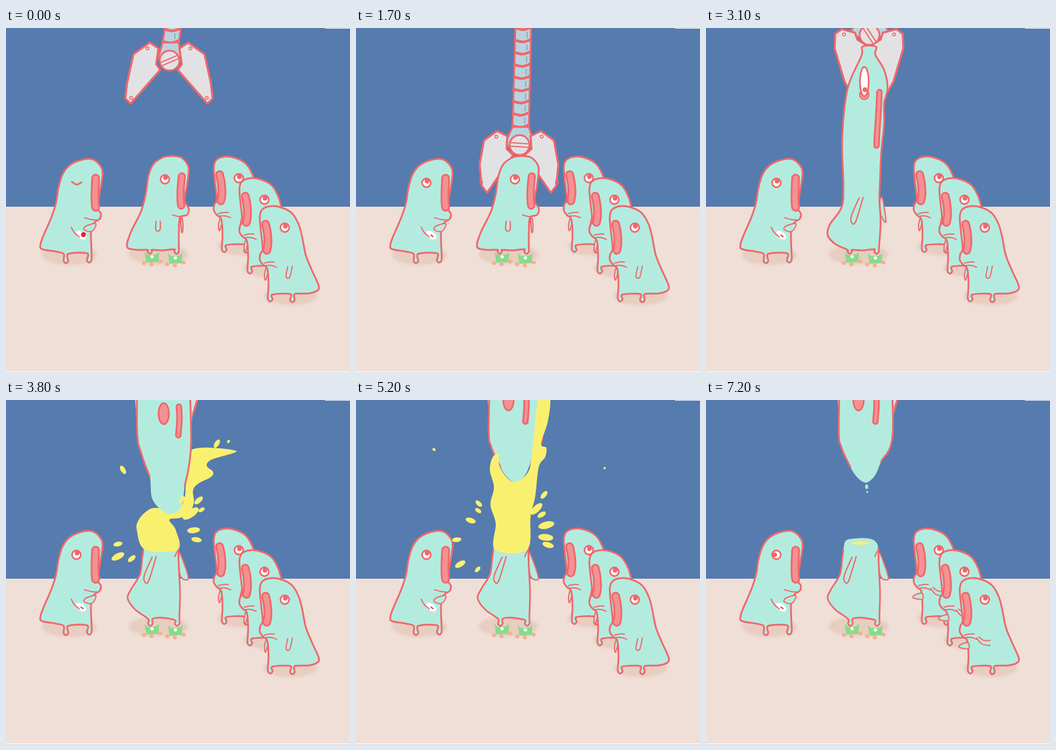
Animation of 591x591 px, one loop 7300 ms. Source, as an HTML page with a canvas:

```html
<!DOCTYPE html>
<html lang="en">
<head>
<meta charset="utf-8">
<title>Claw</title>
<style>
html, body { margin: 0; width: 100%; height: 100%; overflow: hidden; background: #efdfd7; }
canvas { display: block; width: 591px; height: 591px; }
</style>
</head>
<body>
<canvas id="stage" width="591" height="591"></canvas>
<script>
const ctx = document.getElementById('stage').getContext('2d');
const LOOP = 7300, STEP = 100;
const MINT = '#b3ecdf', CORAL = '#f0676b', PINK = '#f49293', YELLOW = '#faf070',
  STEEL = '#e2e2e4', SHAFT = '#b9d3de', WHITE = '#fff';

const lerp = (a, b, k) => a + (b - a) * k;
const mix = (a, b, k) => a.map((v, i) => lerp(v, b[i], k));
const shift = (pts, dx, dy) => pts.map((v, i) => v + (i % 2 ? dy : dx));

// Piecewise linear value over [time, value] pairs
function track(t, keys) {
  if (t <= keys[0][0]) return keys[0][1];
  for (let i = 1; i < keys.length; i++) {
    const [t0, a] = keys[i - 1], [t1, b] = keys[i];
    if (t <= t1) return lerp(a, b, (t - t0) / (t1 - t0));
  }
  return keys[keys.length - 1][1];
}

function paint(fill, stroke, width = 3) {
  if (fill) { ctx.fillStyle = fill; ctx.fill(); }
  if (stroke) { ctx.strokeStyle = stroke; ctx.lineWidth = width; ctx.stroke(); }
}

// Smooth curve through flat x,y points
function curve(pts, fill, stroke, width, open) {
  const n = pts.length / 2;
  const at = i => {
    const j = open ? Math.max(0, Math.min(n - 1, i)) : (i + n) % n;
    return [pts[2 * j], pts[2 * j + 1]];
  };
  ctx.beginPath();
  ctx.moveTo(...at(0));
  for (let i = 0; i < (open ? n - 1 : n); i++) {
    const a = at(i - 1), b = at(i), c = at(i + 1), d = at(i + 2);
    ctx.bezierCurveTo(b[0] + (c[0] - a[0]) / 6, b[1] + (c[1] - a[1]) / 6,
      c[0] - (d[0] - b[0]) / 6, c[1] - (d[1] - b[1]) / 6, c[0], c[1]);
  }
  if (!open) ctx.closePath();
  paint(fill, stroke, width);
}

const line = (pts, width = 2, color = CORAL) => curve(pts, null, color, width, true);

function mouth(pts, width) {
  line(pts, width);
  line(pts, width - 6, PINK);
}

// Outline points of a stubby leg, right to left, hanging from y
const leg = (x, y, h) => [x + 4, y, x + 4, y + h - 4, x, y + h, x - 4, y + h - 4, x - 4, y];

function poly(pts, fill, stroke, width) {
  ctx.beginPath();
  for (let i = 0; i < pts.length; i += 2) ctx.lineTo(pts[i], pts[i + 1]);
  ctx.closePath();
  paint(fill, stroke, width);
}

function oval(x, y, rx, ry, fill, stroke, width, turn = 0) {
  ctx.beginPath();
  ctx.ellipse(x, y, rx, ry, turn, 0, 7);
  paint(fill, stroke, width);
}

function shadow(x, y, rx, ry) {
  ctx.filter = 'blur(2px)';
  oval(x, y, rx, ry, 'rgba(226,190,176,.55)');
  ctx.filter = 'none';
}

function eye(x, y, dx, dy, ry = 7.5) {
  oval(x, y, 7.5, ry, WHITE, CORAL, 2.8);
  oval(x + dx, y + dy, 4, 4, CORAL);
}

function closedEye(x, y) {
  line([x - 8, y - 1, x, y + 4, x + 9, y], 2.8);
}

function room() {
  ctx.fillStyle = '#efdfd7';
  ctx.fillRect(0, 0, 591, 591);
  ctx.fillStyle = '#567bae';
  ctx.fillRect(0, 0, 591, 307);
  ctx.fillStyle = WHITE;
  ctx.fillRect(0, 590, 591, 1);
  ctx.fillRect(548, 0, 43, 1);
}

const FILMER = [59, 373, 63, 360, 78, 325, 86, 300, 90, 275, 97, 252, 108, 237, 125, 228, 146, 225, 160, 234,
  166, 250, 160, 290, 157, 309, 163, 319, 161, 328, 153, 333, 147, 342, 146, 360,
  ...leg(143, 387, 16), ...leg(103, 388, 16), 85, 384, 62, 380];

function filmer(t) {
  shadow(109, 390, 47, 17);
  curve(FILMER, MINT, CORAL);
  mouth([154, 258, 153, 280, 153, 298, 154, 308], 15);
  line([135, 326, 146, 329, 158, 330]);
  curve([134, 346, 138, 340, 154, 336, 151, 346, 144, 350], MINT, CORAL, 2);
  ctx.save();
  ctx.translate(129, 356);
  ctx.rotate(.6);
  oval(0, 0, 10, 6, WHITE);
  ctx.fillStyle = '#b8484e';
  if (t >= 900) ctx.fillRect(-1, -1, 6, 2);
  ctx.restore();
  if (t < 900) oval(133, 355, 4.2, 4.2, '#f01f2a');
  line([112, 342, 117, 351, 126, 359]);
  if (t % 4400 < 200) return closedEye(121, 265);
  const aside = (t >= 1900 && t < 2600) || t >= 6600;
  eye(121, 266, aside ? -3 : 1, aside ? 0 : -3);
}

const WATCHER = [436, 325, 440, 312, 455, 306, 475, 309, 492, 319, 503, 338, 509, 360, 515, 390, 525, 415,
  537, 442, 535, 451, 520, 456, ...leg(492, 457, 14), ...leg(454, 458, 12),
  451, 440, 449, 414, 441, 406, 436, 398, 437, 388, 441, 379, 438, 350];

function watcher(dx, dy, t) {
  const clapping = t >= 5500, sway = Math.floor(t / 200) % 2 * 3;
  ctx.save();
  ctx.translate(dx, dy);
  shadow(489, 460, 46, 16);
  if (!clapping) curve([447, 412, 444, 425, 446, 433, 451, 415], MINT, CORAL, 2);
  curve(WATCHER, MINT, CORAL);
  mouth([446, 337, 449, 352, 450, 370, 448, 382], 15);
  line([444, 404, 453, 402, 461, 402]);
  line([447, 408, 456, 408, 465, 411]);
  if (clapping) {
    curve(shift([450, 417, 438, 420, 435, 425, 451, 427], 0, sway), MINT, CORAL, 2);
    line(shift([465, 409, 474, 419, 488, 422], 0, sway));
    line(shift([469, 407, 477, 413, 488, 413], 0, sway));
  } else {
    line([484, 410, 481, 426, 484, 430, 488, 427, 492, 409]);
  }
  if (t % 1600 === 500) closedEye(479, 342);
  else eye(479, 343, 1, -2.5);
  ctx.restore();
}

const BLADE_OPEN = [-33, -31, -18, -21, -22, 6, -15, 16, -66, 74, -75, 65, -72, 39, -61, -11];
const BLADE_SHUT = [-47, -10, -24, -4, -20, 8, 0, 20, -32, 98, -42, 80, -59, 23, -58, -2];

function claw(y, shut) {
  const top = y - 31;
  poly([274, -5, 301, -5, 297, top, 269, top], SHAFT, CORAL);
  for (let b = top; b > -6; b -= 21) {
    const x = lerp(269, 274, (top - b) / (top + 6));
    line([x, b - 2, x + 14, b + 1, x + 27, b - 3], 4.5);
    ctx.fillStyle = '#8fa9b7';
    ctx.fillRect(x + 20, b - 16, 2, 10);
  }
  const spread = 19 + 14 * shut;
  poly([269, top, 297, top, 281 + spread, y - 6, 277 + spread, y + 3, 285 - spread, y + 3, 281 - spread, y - 6],
    SHAFT, CORAL);
  for (const side of [1, -1]) {
    ctx.save();
    ctx.translate(280, y);
    ctx.scale(side, 1);
    poly(mix(BLADE_OPEN, BLADE_SHUT, shut), STEEL, CORAL, 3.5);
    oval(lerp(-37, -43, shut), lerp(-21, -1, shut), 2.5, 2.5, null, CORAL, 1.5);
    if (shut < .5) oval(-65, 64, 2.5, 2.5, null, CORAL, 1.5);
    ctx.restore();
  }
}

function screw(y, shut) {
  oval(281, y, 17, 17, STEEL, CORAL, 3);
  ctx.save();
  ctx.translate(281, y);
  ctx.rotate(lerp(-.4, 1, shut));
  for (const dy of [-3, 3]) line([-15, dy, 15, dy], 2);
  ctx.restore();
}

// Three poses each: standing, gripped, stretched
const FEET = [...leg(293, 380, 8), 270, 382, ...leg(247, 381, 7)];
const STANDING = [223, 381, 208, 376, 214, 352, 232, 315, 240, 285, 245, 253, 254, 233, 270, 222, 282, 220,
  288, 220, 300, 222, 309, 230, 314, 242, 311, 270, 307, 296, 314, 310, 311, 321, 299, 326, 297, 350];
const GRIPPED = [222, 382, 208, 372, 223, 346, 232, 318, 235, 280, 241, 240, 246, 212, 271, 186, 271, 172,
  290, 172, 291, 186, 304, 197, 309, 214, 304, 245, 307, 275, 303, 302, 306, 315, 298, 322, 297, 350];
const STRETCHED = [222, 371, 209, 356, 213, 337, 233, 308, 236, 270, 234, 190, 243, 105, 267, 48, 269, 32,
  292, 32, 291, 46, 306, 72, 312, 103, 306, 130, 306, 165, 301, 215, 299, 262, 298, 295, 300, 335];
const BODY = [STANDING, GRIPPED, STRETCHED];
const MOUTH = [
  [302, 255, 300, 278, 300, 296, 301, 305],
  [297, 227, 298, 250, 298, 275, 297, 294],
  [298, 110, 296, 150, 294, 180, 293, 202]];
const ARM = [
  [258, 332, 257, 345, 261, 349, 265, 345, 265, 332],
  [257, 332, 250, 342, 251, 348, 258, 345, 266, 335],
  [263, 292, 250, 322, 250, 334, 257, 333, 270, 291]];
const BACK_ARM = [
  [300, 330, 302, 351, 304, 345, 303, 328],
  [300, 332, 306, 356, 297, 347, 297, 340],
  [303, 292, 309, 333, 300, 320, 298, 300]];
const EYE = [[273, 260, 7.5, -3], [273, 220, 15, -7], [272, 92, 25, 14]];

function victim(pull) {
  const i = pull < 1 ? 0 : 1;
  const pose = set => mix(set[i], set[i + 1], pull - i);
  curve(pose(BACK_ARM), MINT, CORAL, 2.2);
  curve([...pose(BODY), ...FEET], MINT, CORAL);
  mouth(pose(MOUTH), pull < .5 ? 14 : 11);
  line(pose(ARM), 2.2);
  if (pull < .4) line([286, 321, 298, 324, 309, 322]);
  const [x, y, ry, look] = pose(EYE);
  if (pull > 1.3) oval(x, y + ry - 3, 8, 9, PINK, CORAL, 2);
  eye(x, y, 1, Math.min(look, ry - 5), ry);
}

const STUMP = [296, 256, 297, 290, 299, 330, 298, 370, ...leg(294, 378, 10), 267, 374, ...leg(248, 376, 12),
  222, 360, 209, 341, 215, 325, 230, 300, 234, 272, 236, 258];

function stump() {
  curve([298, 262, 313, 303, 308, 309, 300, 303, 297, 285], MINT, CORAL, 2.2);
  curve([...STUMP, 240, 242, 255, 238, 280, 238, 292, 244], MINT);
  line(STUMP, 2.8);
  line(shift(ARM[2], -12, -22), 2.2);
  line([294, 260, 290, 269]);
  oval(266, 246, 15, 2.8, YELLOW);
}

const TORN_LONG = [227, -130, 225, 25, 233, 70, 247, 108, 252, 148, 278, 172, 300, 162, 307, 125, 318, 50, 312, -130];
const TORN_REST = [233, -130, 228, 45, 233, 82, 248, 115, 260, 133, 275, 142, 290, 130, 301, 105, 321, 55, 314, -130];

function tornHead(t) {
  const rest = track(t, [[4400, 0], [5200, 1]]);
  ctx.save();
  ctx.translate(0, track(t, [[3500, 94], [3900, 0]]));
  const pts = mix(TORN_LONG, TORN_REST, rest);
  curve(pts, MINT);
  line(pts.slice(0, 8), 3);
  line(pts.slice(-6), 3);
  oval(lerp(271, 262, rest), 0, 9, 18, PINK, CORAL, 2.8);
  mouth(shift([292, -12, 293, 10, 291, 37], 5 - 5 * rest, 0), 11);
  ctx.restore();
  if (t >= 4200 && t < 4700) {
    oval(273, 136 + (t - 4400) / 20, 6, 6, YELLOW);
    oval(272, 180, 3.5, 3.5, '#9bd9d3');
  }
  if (t >= 5000) {
    const drip = t < 6400 ? '#4c86ae' : MINT;
    oval(276, 149, 2.5, 4, drip);
    oval(277, 158, 1.5, 2, drip);
  }
}

const GUSH = [239, 257, 220, 205, 223, 178, 238, 155, 255, 145, 290, 150, 308, 120, 315, 60, 318, -12,
  394, -8, 355, 15, 348, 32, 360, 48, 357, 62, 335, 80, 325, 98, 323, 130, 312, 158,
  295, 172, 276, 177, 287, 205, 295, 257];
const COLUMN = [239, 257, 240, 212, 231, 180, 237, 150, 230, 120, 235, 98, 245, 93, 246, 112, 259, 133,
  275, 141, 295, 125, 302, 95, 314, -6, 333, -6, 330, 35, 318, 75, 327, 82, 325, 98, 314, 115,
  308, 165, 300, 200, 294, 257];

// Scales the stream from the stump and ripples it sideways
function stream(pts, height, t) {
  const phase = (t % 800 - 400) / 800 * Math.PI * 2;
  const out = pts.slice();
  for (let i = 0; i < out.length; i += 2) {
    const rise = 257 - pts[i + 1];
    out[i] += 5 * Math.sin(phase) * Math.sin(rise / 40);
    out[i + 1] = 257 - rise * height;
  }
  curve(out, YELLOW);
}

// Drops as x, y, length; each one points away from the stump
const GUSH_DROPS = [[214, 142, 8], [343, 106, 8], [359, 103, 3], [207, 244, 8], [207, 261, 12], [226, 264, 8],
  [295, 183, 7], [318, 184, 9], [307, 202, 16], [322, 197, 6], [311, 225, 11], [315, 238, 9]];
const COLUMN_DROPS = [[134, 85, 3], [211, 178, 7], [210, 190, 6], [197, 207, 9], [173, 240, 8], [179, 282, 10],
  [209, 291, 6], [323, 163, 8], [310, 187, 13], [319, 197, 8], [327, 215, 14], [326, 236, 13], [330, 249, 10],
  [427, 117, 2]];

function drops(t) {
  const spread = .5 + t % 800 / 800;
  for (const [x, y, size] of t < 4800 ? GUSH_DROPS : COLUMN_DROPS) {
    const dx = x - 266, dy = y - 230;
    oval(266 + dx * spread, 230 + dy * spread, size, size * .35 + 1.2, YELLOW, null, 0, Math.atan2(dy, dx));
  }
}

function boot(x, y) {
  poly([x - 13, y - 8, x - 7, y - 3, x + 7, y - 4, x + 12, y - 9, x + 11, y + 9, x - 10, y + 10], '#86dc8b');
  oval(x, y, 2.8, 2.8, WHITE);
  for (const [dx, dy] of [[-14, 11], [-1, 13], [14, 8]]) oval(x + dx, y + dy, 3.6, 3.2, '#f5b08f');
}

function draw(t) {
  const clawY = track(t, [[800, 56], [1600, 200], [2000, 204], [2300, 152], [3100, 12], [3500, -58]]);
  const shut = track(t, [[1600, 0], [1900, 1]]);
  room();
  claw(clawY, shut);
  filmer(t);
  shadow(262, 389, 51, 17);
  if (t >= 3500) {
    const gushing = t < 4800;
    stump();
    if (gushing) stream(GUSH, track(t, [[3500, .1], [4000, 1]]), t);
    tornHead(t);
    if (!gushing && t < 6400) stream(COLUMN, track(t, [[5600, 1], [6400, .03]]), t);
    if (t >= 3600 && t < 6300) drops(t);
  } else {
    victim(track(t, [[1700, 0], [2300, 1], [3100, 2], [3500, 2.5]]));
    screw(clawY, shut);
  }
  boot(251, 393);
  boot(291, 395);
  watcher(-79, -85, t);
  watcher(-35, -48, t);
  watcher(0, 0, t);
}

ctx.lineJoin = ctx.lineCap = 'round';
const start = performance.now();
function frame() {
  const t = (performance.now() - start) % LOOP;
  draw(Math.floor(t / STEP) * STEP);
  requestAnimationFrame(frame);
}
frame();
</script>
</body>
</html>
```
